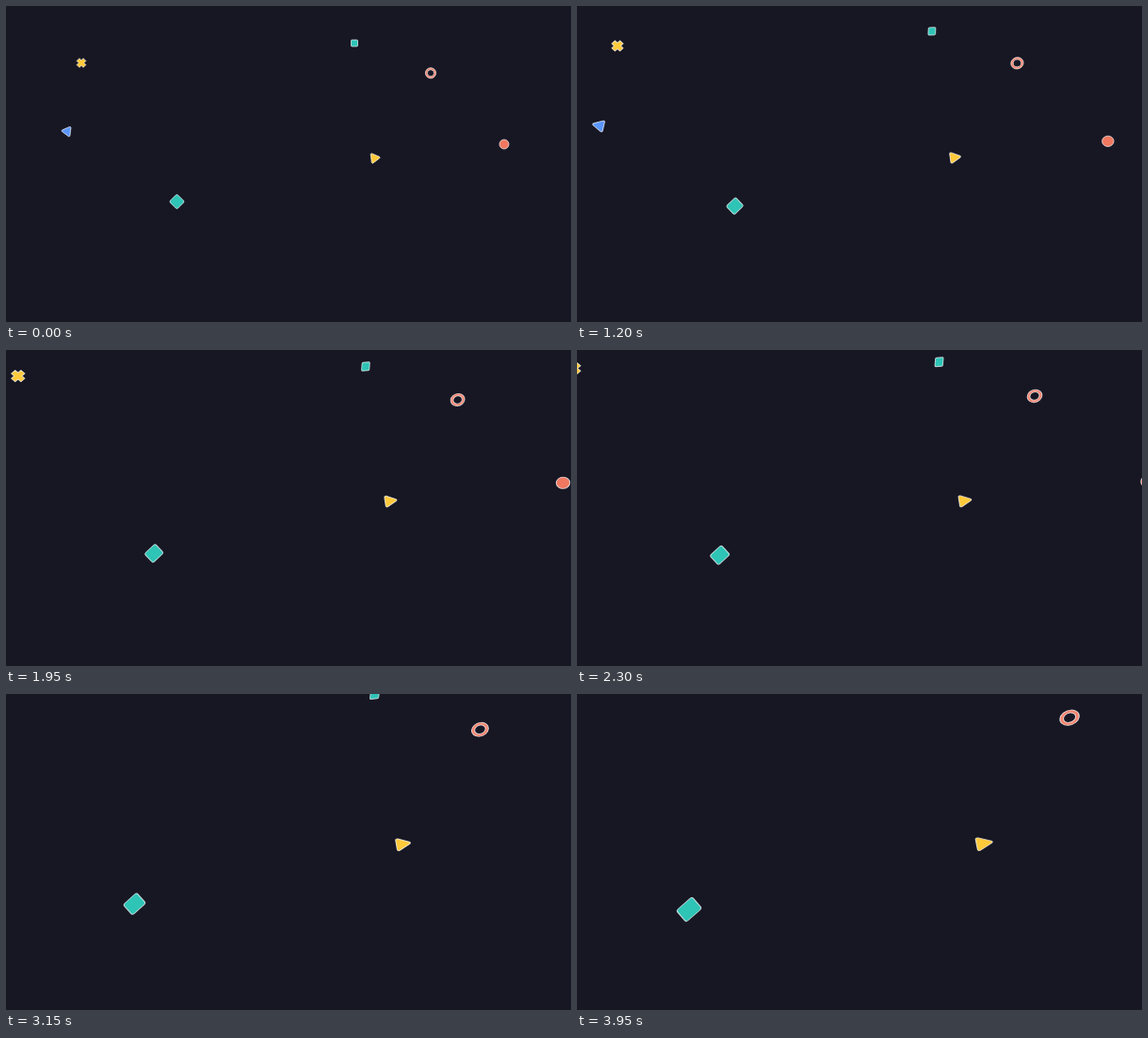
Animation of 600x336 px, one loop 4000 ms. Source, as an HTML page with a canvas:

```html
<!DOCTYPE html>
<html lang="en">
<head>
<meta charset="utf-8">
<title>Drifting shapes</title>
<style>
  html, body { margin: 0; width: 100%; height: 100%; overflow: hidden; background: #171724; }
  canvas { display: block; }
</style>
</head>
<body>
<canvas id="stage" width="600" height="336"></canvas>
<script>
const LOOP = 4000, STEP = 50;
const CX = 300, CY = 168; // vanishing point
const BACK = '#171724', EDGE = 'rgba(255, 255, 255, 0.72)';
const ctx = document.getElementById('stage').getContext('2d');

const outlines = {
  circle(p, r) { p.arc(0, 0, r, 0, 7); },
  ring(p, r) {
    p.arc(0, 0, r, 0, 2 * Math.PI);
    p.moveTo(r * 0.64, 0);
    p.arc(0, 0, r * 0.64, 0, 2 * Math.PI);
  },
  square(p, r) { p.roundRect(-r, -r, 2 * r, 2 * r, r * 0.28); },
  triangle(p, r) {
    const corner = i => [r * Math.cos(i * 2 * Math.PI / 3), r * Math.sin(i * 2 * Math.PI / 3)];
    p.moveTo(-r / 2, 0);
    for (let i = 2; i < 5; i++) p.arcTo(...corner(i), ...corner(i + 1), r * 0.15);
    p.closePath();
  },
  cross(p, r) {
    const w = r * 0.4;
    const corners = [[r, -w], [r, w], [w, w]];
    for (let i = 0; i < 4; i++) {
      const c = Math.round(Math.cos(i * Math.PI / 2));
      const s = Math.round(Math.sin(i * Math.PI / 2));
      for (const [x, y] of corners) p.lineTo(x * c - y * s, x * s + y * c);
    }
    p.closePath();
  }
};

// x, y: offset from the vanishing point; rate: approach per second;
// turn, spin: angle and its change per second; pull: stretch direction (degrees)
const shapes = [
  { kind: 'cross', color: '#ffca3a', x: -220, y: -107.5, r: 4.9, rate: 0.12, turn: 45, spin: 0, pull: 0 },
  { kind: 'triangle', color: '#5a96fa', x: -235, y: -34.7, r: 6.9, rate: 0.1238, turn: 187, spin: 5, pull: 8 },
  { kind: 'square', color: '#2ec4b6', x: 70, y: -128.5, r: 3.5, rate: 0.0748, turn: 0, spin: 0, pull: -61 },
  { kind: 'ring', color: '#f4806a', x: 151, y: -96.7, r: 5.6, rate: 0.0818, turn: 0, spin: 0, pull: -21 },
  { kind: 'circle', color: '#f07860', x: 229, y: -21, r: 5, rate: 0.11, turn: 0, spin: 0, pull: -3 },
  { kind: 'triangle', color: '#ffca3a', x: 91.2, y: -6.3, r: 6.9, rate: 0.0763, turn: -7, spin: -0.8, pull: -8 },
  { kind: 'square', color: '#2ec4b6', x: -118.5, y: 40, r: 5.7, rate: 0.0874, turn: -45, spin: 1, pull: -42 }
];

const rad = deg => deg * Math.PI / 180;

function drawShape(s, sec) {
  const scale = 1 / (1 - s.rate * sec);
  const grow = sec / 4;
  const pull = rad(s.pull);
  const path = new Path2D();
  outlines[s.kind](path, s.r);

  ctx.save();
  ctx.translate(CX + s.x * scale, CY + s.y * scale);
  ctx.rotate(pull);
  ctx.scale(scale * (1 + 0.28 * grow), scale * (1 - 0.07 * grow));
  ctx.rotate(rad(s.turn + s.spin * sec) - pull);
  ctx.fillStyle = s.color;
  ctx.fill(path, 'evenodd');
  ctx.lineJoin = 'round';
  ctx.lineWidth = 0.9 / scale;
  ctx.strokeStyle = EDGE;
  ctx.stroke(path);
  ctx.restore();
}

function frame() {
  const t = Math.floor(performance.now() % LOOP / STEP) * STEP;
  ctx.fillStyle = BACK;
  ctx.fillRect(0, 0, 600, 336);
  for (const s of shapes) drawShape(s, t / 1000);
  requestAnimationFrame(frame);
}
frame();
</script>
</body>
</html>
```
